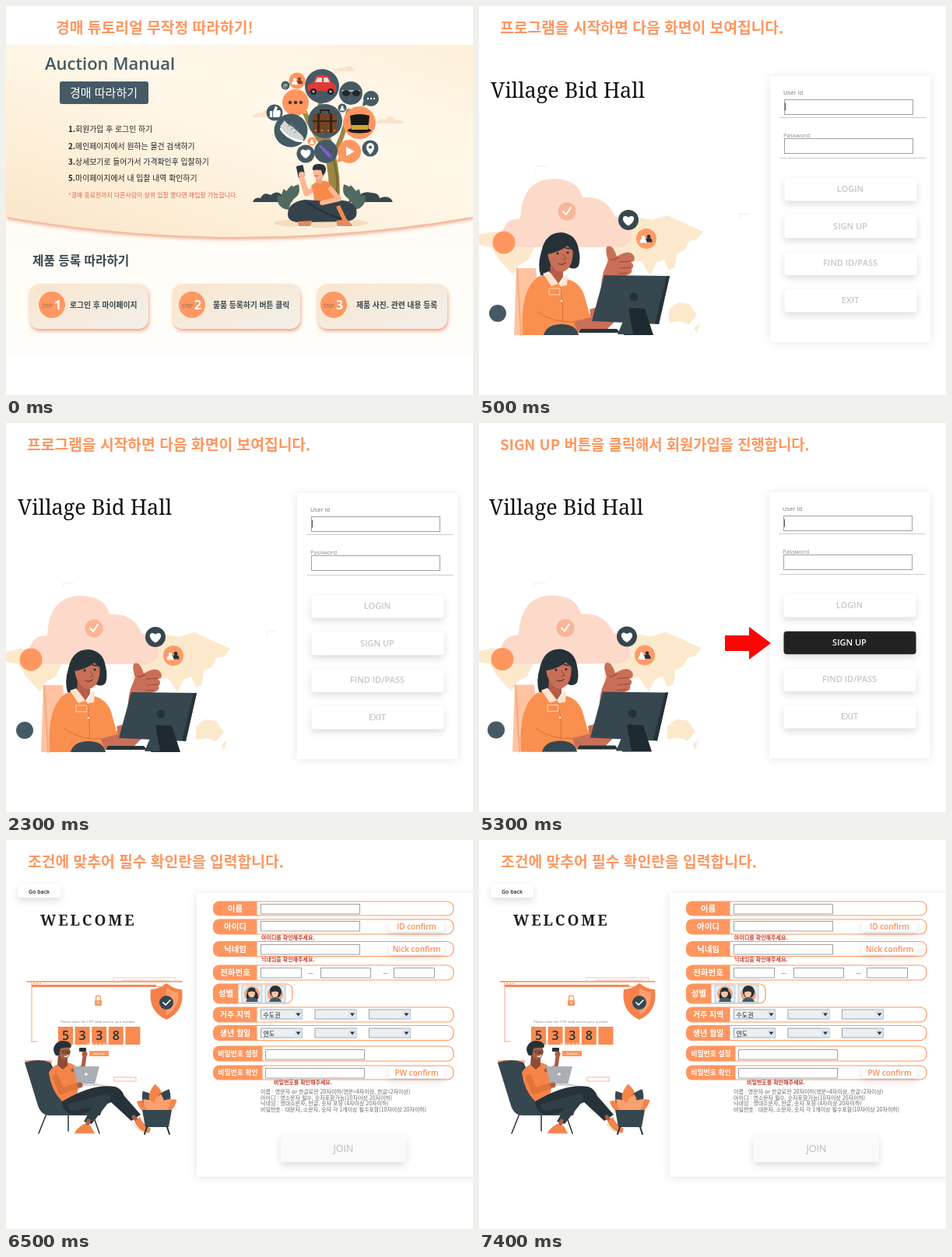
Recreate the animation shown at these times as an HTML page. Size 600x500 px, loop 8 s.

```html
<!DOCTYPE html>
<html lang="ko">
<head>
<meta charset="utf-8">
<title>경매 튜토리얼</title>
<style>
html, body { margin: 0; width: 100%; height: 100%; overflow: hidden; background: #fff; }
svg { display: block; width: 600px; height: 500px; font-family: "Noto Sans CJK KR", "Noto Sans CJK", "Noto Sans", sans-serif; white-space: pre; }
.latin { font-family: "Open Sans", "Noto Sans", sans-serif; }
.slab { font-family: "Noto Serif", serif; }
.b { font-weight: 700; }
.m { font-weight: 500; }
.s { font-weight: 600; }
.c { text-anchor: middle; }
.lift { filter: drop-shadow(0 4px 5px #0002); }
.panel { filter: drop-shadow(0 1px 6px #0000001a); }
.warm { filter: drop-shadow(1px 3px 2px #f0a98a); }
</style>
</head>
<body>
<svg id="stage" viewBox="0 0 600 500"></svg>
<script>
const ORANGE = '#ff965f', INK = '#263238', SLATE = '#455a64', CREAM = '#fce9cc', BROWN = '#c96f58';

const text = (x, y, size, str, fill = INK, cls = '', extra = '') =>
  `<text x="${x}" y="${y}" font-size="${size}" fill="${fill}" class="${cls}" ${extra}>${str}</text>`;
const disc = (x, y, r, fill) => `<circle cx="${x}" cy="${y}" r="${r}" fill="${fill}"/>`;
const oval = (x, y, rx, ry, fill) => `<ellipse cx="${x}" cy="${y}" rx="${rx}" ry="${ry}" fill="${fill}"/>`;
const box = (x, y, w, h, fill, r = 0, extra = '') =>
  `<rect x="${x}" y="${y}" width="${w}" height="${h}" rx="${r}" fill="${fill}" ${extra}/>`;
const shape = (d, fill) => `<path d="${d}" fill="${fill}"/>`;
const line = (d, stroke, w = 1) =>
  `<path d="${d}" fill="none" stroke="${stroke}" stroke-width="${w}" stroke-linecap="round" stroke-linejoin="round"/>`;
const at = (x, y, scale, angle, body) =>
  `<g transform="translate(${x} ${y}) rotate(${angle}) scale(${scale})">${body}</g>`;
const each = (list, draw) => list.map(draw).join('');

const heart = (x, y, s) => at(x, y, s, 0, shape('M0 6C-11-1-6-9 0-4C6-9 11-1 0 6Z', '#fff'));
const bust = (x, y, s, fill) => at(x, y, s, 0, disc(0, -3, 2.6, fill) + shape('M-5 5q0-6 5-6t5 6z', fill));
const leaf = (x, y, len, angle, fill) => at(x, y, len / 10, angle, shape('M0 0q-5-5 0-10q5 5 0 10z', fill));
const dots = (x, y, gap, r, fill, n = 3) => each([...Array(n).keys()], i => disc(x + i * gap, y, r, fill));
const heading = (x, str, size = 19.25) => text(x, 35, size, str, ORANGE, 'b');

function auctionTree() {
  const skin = '#ffb696', trunk = '#9b8745';
  return shape('M316 143q4-7 11-5q6-8 12 2q7-2 9 3zM474 151q6-8 13-5q8-9 15 1q7-1 9 4zM421 84q8-7 15-4q6-7 13 4z', '#fbe2cd')
    + oval(405, 279, 61, 6, '#f5dcc0')
    + line('M421 252Q425 212 410 170', trunk, 14) + line('M412 185Q392 160 383 135', trunk, 6)
    + line('M418 195Q434 170 440 135M408 165Q400 130 406 115', trunk, 6)
    + line('M425 248Q429 212 414 180', '#7b6b35', 3)
    + shape('M317 252q3-7 10-5q4-9 13-4q8-7 15 0q9-1 13 9zM440 252q4-8 12-6q6-9 17-6q10 0 11 7q13-5 17 5z', '#37474f')
    + each([-40, -18, 8, 30], (a, i) => leaf(364, 262 - i * 4, 24, a, '#526a61') + leaf(446, 262 - i * 4, 24, -a, '#526a61'))
    // goods and badges
    + disc(406, 103, 22, SLATE) + shape('M388 109v-8l6-2 4-9q8-3 16 0l5 9 5 3v8z', '#e03a35')
    + shape('M397 98l3-6h6v6zM408 92h5l3 6h-8z', '#d7e3e8') + disc(395, 110, 4, '#222') + disc(417, 110, 4, '#222')
    + disc(395, 110, 1.6, '#bbb') + disc(417, 110, 1.6, '#bbb')
    + disc(443, 112, 15, SLATE) + line('M432 109h22', '#e3dcc8', 1.5) + oval(437, 112, 5, 4, '#20282b') + oval(450, 112, 5, 4, '#20282b')
    + disc(469, 119, 10, SLATE) + shape('M459 122l-1 7 7-3z', SLATE) + dots(465, 119, 4, 1.2, '#fff')
    + disc(359, 102, 5.5, SLATE) + text(359, 104.5, 7, '@', '#fff', 'c latin')
    + disc(374, 96, 10.5, ORANGE) + bust(377, 96, .8, '#7a3d25') + bust(371, 97, .8, '#fff')
    + disc(372, 124, 17, ORANGE) + shape('M376 139l12-1-4-9z', ORANGE) + dots(365, 124, 7, 2.3, '#4d3a33')
    + disc(345, 137, 10.5, SLATE) + shape('M339 135h3v8h-3zM343 136l3-7q4 0 2 5h4q2 4-1 9h-8z', '#fff')
    + disc(366, 160, 21.5, SLATE) + shape('M352 155l6-8q4 6 10 8l11 10q6 6 2 9-9 3-17-5-9-7-12-14z', '#d4d5d5')
    + line('M353 158q9 14 28 16', '#fff', 2.5) + line('M362 155l6-3M366 159l5-4M370 163l5-4', '#8b9296')
    + disc(410, 148, 22, SLATE) + line('M404 138v-4h11v4', '#2e1b12', 2) + box(394, 138, 31, 25, '#714528', 2)
    + box(394, 147, 31, 2, '#3b2213') + box(400, 138, 3, 25, '#3b2213') + box(416, 138, 3, 25, '#3b2213') + dots(398, 160, 8, 1, '#d6a35b', 4)
    + disc(432, 131, 5.5, SLATE) + bust(432, 131.5, .6, '#fff')
    + disc(454, 150, 21, ORANGE) + shape('M442 141q12-4 25 0l-2 19h-21z', '#181818') + oval(454, 160, 15, 3.5, '#181818') + shape('M443 153h23l-1 6h-21z', '#cfa533')
    + disc(385, 190, 11.5, SLATE) + heart(385, 190, 1)
    + disc(393, 174, 5.5, ORANGE) + bust(393, 174.5, .6, '#fff')
    + disc(411, 187, 15, SLATE) + shape('M401 179l4-1 14 13 1 6-6-2z', '#6d55b3') + line('M403 180l13 13', '#a793dd')
    + disc(441, 187, 15, ORANGE) + shape('M428 192l-3 9 9-2z', ORANGE) + shape('M437 181l11 6-11 6z', '#fff')
    + disc(468, 183, 10.5, SLATE) + shape('M468 191q-6-7-5-10a5 5 0 0 1 10 0q1 3-5 10z', '#fff') + disc(468, 181.5, 2, SLATE)
    // reader under the tree
    + line('M396 235L386 241 380 221', skin, 7)
    + box(374, 205, 9, 15, '#2c3a42', 1.5, 'transform="rotate(-12 378 212)"') + disc(380, 217, 4, skin)
    + shape('M392 231q10-9 22-5 9 12 8 27-12 6-27 2 2-13-3-24z', '#f58a4b')
    + box(398, 217, 8, 11, '#f2a382') + oval(402, 214, 7.5, 9, skin)
    + shape('M394 211q-1-8 7-8 9-1 10 6 0 6-4 9l-2-7q-6-1-11 0z', '#2c3338') + line('M397 218q2 2 4 0', '#a8503c')
    + shape('M362 268q0-16 22-19l28 2q30-5 37 8 6 14-10 18l-63 1q-14-1-14-10z', '#34434b')
    + line('M386 252q20 14 46 22', '#22303a', 2) + line('M417 235l11 13-22 5', skin, 6)
    + shape('M424 258l5-2 10 21-5 2z', '#f58a4b') + shape('M375 277l18-1-2 8h-15zM424 276l14-2 8 9-20 1z', '#e88a58') + line('M424 284h22M375 284h17', '#fff', 2);
}

function stepCard(x, w, cx, n, label, lx) {
  return box(x, 357, w, 58, 'url(#card)', 13, 'class="warm"') + disc(cx, 384, 17, '#ff9862')
    + text(cx - 13, 388, 7.2, 'STEP', '#9a6a50', 'latin', 'letter-spacing="-.6"') + text(cx + 3, 390, 16, n, '#fff', 'b latin')
    + text(lx, 388, 9.8, label, '#37474f', 'b');
}

function manualScene() {
  const items = [[162, 1, '회원가입 후 로그인 하기'], [184, 2, '메인페이지에서 원하는 물건 검색하기'],
    [204, 3, '상세보기로 들어가서 가격확인후 입찰하기'], [225, 5, '마이페이지에서 내 입찰 내역 확인하기']];
  return box(0, 50, 600, 400, 'url(#floor)')
    + `<path d="M0 50H600V271Q300 323 0 271Z" fill="url(#sky)" class="warm"/>`
    + heading(64, '경매 튜토리얼 무작정 따라하기!')
    + text(50, 82, 22, 'Auction Manual', SLATE, 's latin')
    + box(69, 97, 114, 29, SLATE, 3) + text(82, 117, 15, '경매 따라하기', '#fff')
    + each(items, ([y, n, s]) => text(80, y, 9.9, `<tspan class="b">${n}.</tspan>${s}`, '#222', 'm'))
    + text(80, 246, 7.9, '*경매 종료전까지 다른사람이 상위 입찰 했다면  재입찰 가능합니다.', '#e5604f')
    + auctionTree()
    + text(34, 333, 15.7, '제품 등록 따라하기', '#37474f', 'b')
    + stepCard(30, 153, 59, 1, '로그인 후 마이페이지', 82)
    + stepCard(214, 164, 239, 2, '물품 등록하기 버튼 클릭', 266)
    + stepCard(400, 167, 421, 3, '제품 사진. 관련 내용 등록', 450);
}

function officeWoman() {
  const dark = '#37474f';
  return shape('M0 294l18-4 30 4 26 10-10 22-14 8-6 12-20-22-8-14-16-3zM172 300l8-22 16-8 26 5 20-6 26 12 20 9-8 10-10 2-6 12-10 4-2 18-8 4-6-14-10 4-8 16-12-18-22 2-12 16-12-18zM66 356l18 6-8 36-8 16zM244 390l12-9 14 2 10 14-10 12-12-4-14 2zM276 414l8-6-4 12z', CREAM)
    + shape('M45 310q-18-4-14-22 4-15 22-15 2-50 42-51 32 0 38 24 30-3 42 25 16 0 20 16 5 18-14 23z', '#fdd9ca')
    + disc(113, 264, 11.5, '#f9b597') + line('M108 264l4 4 6-9', '#fff', 2)
    + disc(192, 275, 13, dark) + heart(192, 276, 1.1)
    + disc(215, 299, 13, '#ff9a66') + bust(218, 299, .9, INK) + bust(211, 300, .9, '#fff')
    + disc(32, 304, 14.5, ORANGE) + disc(24, 395, 11, SLATE)
    + shape('M48 337h25l8 86H45z', '#ffc3a1') + line('M49 338l5 85', '#f4aa83', 2)
    // hair, head and body
    + shape('M79 346q-4-14 1-30 5-25 26-25 19 2 22 22 3 12 0 21-5 6-12 2l-16 10q-10 4-21 0z', INK)
    + shape('M92 328h16v20l-8 12-9-14z', '#b45d49') + shape('M88 312q6-8 14-7 13-2 18 4 2 16-3 25-6 10-16 7-13-8-13-29z', BROWN)
    + shape('M87 319q-2-22 18-24 17 1 20 20-8-1-11-7-12 9-27 11z', INK)
    + disc(101, 318, 1.5, INK) + disc(114, 317, 1.5, INK) + line('M97 313l5-1M111 311l5 1', INK, 1.5) + line('M108 319l4 6-4 1', '#96483a') + line('M102 331q5 3 9-1', '#7d3329', 1.3)
    + shape('M56 423q-4-58 20-75l16-5 12 16 9-8q16 4 22 20l7 25 9-2 5 13-35 16z', '#f9904f')
    + shape('M82 344l8-3 12 16-9 3zM111 345l3 2-1 12-10 2z', '#ffe4d2') + line('M104 360q6 30 2 60', '#d8703a')
    + box(90, 363, 14, 8, 'none', 0, 'stroke="#ffd3b5"') + dots(106, 379, 1, 1.2, '#fff', 1)
    + shape('M157 385q-2-34 5-48l4-10q-5-15-1-18 7-3 12 13 16-10 22-1 3 7-4 8 6 4 1 9 2 6-6 8-7 4-16 4-2 18 2 35z', BROWN)
    + line('M179 323q-6 4-10 3M180 329l15-1M181 337l14-1M180 344l10-1', '#96483a', 1.2)
    + shape('M142 390l20-6 12 22-12 12h-38l-4-12 24-6z', BROWN) + shape('M66 388q22 24 56 18l6 17H64z', '#f9904f') + line('M75 393q20 15 50 13', '#d8703a')
    // desk equipment
    + shape('M161 346l84 1-14 62-86-4z', dark) + shape('M241 347h4l-14 62-5-1z', INK) + disc(199, 374, 5.5, INK)
    + shape('M193 388l20 1 11 34h-38z', '#1f2a30') + shape('M192 389l6 33h-20z', dark)
    + shape('M131 415h46l4 5h-53z', INK) + shape('M83 423q4-14 23-14t22 14z', dark);
}

const field = (x, y, w, h, stroke = '#a0a0a0', fill = '#fff') => box(x, y, w, h, fill, 0, `stroke="${stroke}"`);

function loginScene(title, chosen, size) {
  const shift = chosen ? -1 : 0;
  const buttons = ['LOGIN', 'SIGN UP', 'FIND ID/PASS', 'EXIT'];
  return heading(27, title, size)
    + `<g transform="translate(${2 * shift} ${shift / 2})">`
    + text(15, 118, 27, 'Village Bid Hall', '#111', 'slab') + officeWoman()
    + line('M73 212v-6h14' + (chosen ? '' : 'M335 273v-6h12'), '#eee') + '</g>'
    + `<g transform="translate(${shift} ${shift})">`
    + box(374, 90, 206, 342, '#fff', 3, 'class="panel"')
    + text(391, 113.5, 7.6, 'User Id', '#777', 'latin') + text(391, 169, 7.6, 'Password', '#888', 'latin')
    + field(392.5, 120.5, 165, 19) + field(392.5, 170.5, 165, 19)
    + line('M393.5 125v9', '#555') + line('M387 143.5H574M387 195.5H574', '#ccc')
    + each(buttons, (label, i) => {
      const y = 221 + i * 47.7, on = label === chosen;
      return box(392.5, y, 170, 29.5, on ? '#222' : '#fff', 4, 'class="lift"')
        + text(477, y + 18, 11, label, on ? '#fff' : '#c8c5c5', 'c s latin');
    }) + '</g>'
    + (chosen ? shape('M316 273h31v-11l28 21-28 21v-11h-31z', '#fb0505') : '');
}

function verifyMan() {
  const skin = '#a95f43', dark = '#37474f';
  return line('M33 259V182M33 188.5H198M40 259h-7', '#f6a27a') + line('M27 182H226', '#f58a55', 1.3) + box(33, 186, 160, 3, '#f58a55')
    + line('M138 182v-5h80v5M150 180h60', '#f8b898', .8)
    + dots(36, 184.5, 4, 1, ORANGE) + box(24, 283, 35, 4, '#fbb28d') + box(139, 305, 28, 5, 'none', 0, 'stroke="#f8b898"')
    + line('M115.5 207v-4a3 3 0 0 1 6 0v4', ORANGE, 1.3) + box(114, 206, 9, 7, ORANGE, 1) + disc(118.5, 209, 1, '#fff')
    + text(118, 235, 4.3, 'Please enter the CITY code sent to your number', '#777', 'c latin')
    + each(['5', '3', '3', '8', ''], (n, i) => box(67 + i * 21.6, 240, 19, 23, '#f98a50') + text(76.5 + i * 21.6, 257, 16, n, INK, 'c s latin'))
    + dots(106, 262, 5, 1.5, '#fbc3a4', 6) + box(107, 271, 25, 7, ORANGE) + text(119.5, 276, 4.3, 'Submit', '#fff', 'c latin')
    + shape('M206 184q10 8 20 8 4 28-20 39-24-11-20-39 10 0 20-8z', '#f5814a') + shape('M206 190q8 5 15 6 2 20-15 29z', '#ff9d6d')
    + disc(206, 209, 9, dark) + line('M202 209l3 3 6-6', '#fff', 1.7)
    // armchair and figure
    + line('M52 352l-10 25M112 354l8 23M80 352v22', INK, 1.5)
    + shape('M24 286q18-6 33 0l22 48 40 6q6 5 2 14H56q-12 0-16-16z', dark) + line('M57 288l20 46 40 7', INK, 1.5)
    + shape('M55 299q7-13 24-13 12 2 17 14l-6 36H72q-14-14-17-37z', '#f58448')
    + line('M86 296l13-4 2-14', skin, 5) + box(94, 267, 9, 5, INK, 1) + disc(101, 275, 3.5, skin)
    + shape('M67 276h12v14l-6 5-7-6z', '#8e4b35') + oval(75, 272, 7.5, 10, skin)
    + shape('M64 277q-6-8 0-15 6-6 15-3 7 3 4 8-8-1-13 1l-2 9z', INK) + line('M73 271h4v3h-4zM79 271h3v3h-3z', INK, .8) + line('M75 278q3 1 5-1', '#fff', 1.2)
    + shape('M72 336q40-24 68-19 8 2 12 12l21 24-12 8-26-24-35 15q-26 6-28-16z', INK)
    + shape('M78 340l50-14q10 2 4 11l-22 28-10-3 10-18-28 4z', '#303e46')
    + shape('M86 291h34l-6 23H92z', '#a9afb3') + disc(103, 301, 2, '#e7eaec') + shape('M88 313h28l14 3H90z', '#d0d4d6')
    + line('M64 305l7 18 20-7', '#e2733b', 8) + disc(95, 315, 3.5, skin)
    + line('M106 361l-2 6M164 356l5 5', skin, 5)
    + shape('M100 365l9 3 5 9H88q2-6 12-12zM165 362l7-6q3 9 14 15l-2 6q-14-3-19-15z', '#f58448') + line('M88 377.500h26M164 364q6 12 20 13', '#ddd', 1.5)
    // potted plant
    + each([-62, -34, -4, 28, 58], (a, i) => leaf(194, 350, 37 - Math.abs(a) * .12, a, i % 2 ? dark : '#f58448'))
    + each([-45, 12, 45], a => leaf(194, 351, 25, a, '#f9a06f'))
    + shape('M175 347h38l-4 22h-30z', dark) + line('M181 369l-3 9M207 369l3 9', INK, 2);
}

const dropdown = (x, y, label = '', w = 53) => field(x, y, w, 12, '#9aa3ad', '#eceff1') + text(x + 3, y + 9.5, 8, label, '#222')
  + box(x + w - 10, y + .5, 10, 11, '#dbe7f3') + shape(`M${x + w - 8} ${y + 4.5}h6l-3 4z`, '#333');
const formButton = (label, y) => box(492, y, 71, 14, '#fff', 3, 'class="lift"') + text(527.5, y + 11, 10, label, '#f98c55', 'c s latin');

function formRow(label, y, h, w = 56, size = 10.5, right = 575) {
  const left = 266.5;
  return box(left, y, right - left, h, '#fff', 8, `stroke="${ORANGE}" stroke-width="1.2"`)
    + shape(`M${left + w} ${y}h${-w + 7}q-7 0-7 7v${h - 14}q0 7 7 7h${w - 7}z`, ORANGE)
    + text(left + w / 2, y + h / 2 + size * .37, size, label, '#fff', 'c b');
}

function portrait(x, hair) {
  return box(x, 187, 26, 22, '#dfeef3', 0, 'stroke="#9bb6c0" stroke-width=".7"') + disc(x + 13, 198, 10, '#f7a27d')
    + shape(`M${x + 6} ${195 + hair}q-1-10 7-10t8 10l-3 5h-9z`, INK) + oval(x + 12.5, 197, 4.5, 5.5, '#f6c3a7')
    + shape(`M${x + 7} 194q3-7 10-3l1 5q-5-3-11 0z`, INK) + shape(`M${x + 5} 208q2-6 8-6t8 6z`, SLATE);
}

function signupScene() {
  const rows = [['이름', 79, 18], ['아이디', 102, 19], ['닉네임', 130.5, 19], ['전화번호', 161, 19], ['성별', 185, 25, 32, 10.5, 368],
    ['거주 지역', 215, 19, 56, 10], ['생년 월일', 238.5, 19, 56, 10], ['비밀번호 설정', 265, 19, 63, 8.9], ['비밀번호 확인', 290, 18, 63, 8.9]];
  const rules = ['이름 : 영문자 or 한글로만 20자이하(영문=4자이상, 한글=2자이상)', '아이디 : 영소문자 필수, 숫자포함가능(10자이상 20자이하)',
    '닉네임 : 영대소문자, 한글, 숫자 포함 (4자이상 20자이하)', '비밀번호 : 대문자, 소문자, 숫자 각 1개이상 필수포함(10자이상 20자이하)'];
  const notes = [[328, 128, '아이디를 확인해주세요.'], [328, 156, '닉네임을 확인해주세요.'], [344, 314, '비밀번호를 확인해주세요.']];
  const inputs = [[327.5, 82.5, 127], [327.5, 104.5, 127], [327.5, 134.5, 127], [327.5, 164.5, 52], [404.5, 164.5, 64], [498.5, 164.5, 52], [333.5, 269.5, 127], [333.5, 293.5, 127]];
  return heading(28, '조건에 맞추어 필수 확인란을 입력합니다.')
    + box(15, 57, 55, 17, '#fff', 3, 'class="lift"') + text(42.5, 68.5, 7, 'Go back', '#222', 'c s latin')
    + text(44, 110, 19, 'WELCOME', '#222', 'slab s', 'letter-spacing="2.9"')
    + verifyMan()
    + box(245, 68, 370, 365, '#fff', 0, 'class="panel"')
    + each(rows, r => formRow(...r))
    + each(inputs, ([x, y, w]) => field(x, y, w, 12.5))
    + line('M389 171.5h5M485 171.5h5', ORANGE, 1.2)
    + portrait(303, 8) + portrait(333, 2)
    + each(['수도권', '연도'], (label, i) => each([label, '', ''], (s, k) => dropdown(327.5 + k * 69.5, 218 + i * 24, s)))
    + formButton('ID confirm', 104) + formButton('Nick confirm', 133) + formButton('PW confirm', 292)
    + each(notes, ([x, y, s]) => text(x, y, 7, s, '#c23b32', 'b'))
    + each(rules, (s, i) => text(327, 326 + i * 7.7, 7, s, '#666'))
    + box(353, 379, 161, 35, '#fafafa', 4, 'class="lift"') + text(433.5, 401, 12.5, 'JOIN', '#b9b9b9', 'c latin');
}

const gradient = (id, dir, ...colors) => `<linearGradient id="${id}" ${dir}>`
  + each(colors, (c, i) => `<stop offset="${i / (colors.length - 1)}" stop-color="${c}"/>`) + '</linearGradient>';
const scenes = [
  [0, manualScene()],
  [500, loginScene('프로그램을 시작하면 다음 화면이 보여집니다.')],
  [3500, loginScene('SIGN UP 버튼을 클릭해서 회원가입을 진행합니다.', 'SIGN UP', 18.75)],
  [6500, signupScene()],
];
const stage = document.getElementById('stage');
stage.innerHTML = '<defs>' + gradient('sky', 'x1="0" y1="1" x2=".9" y2="0"', '#f9e4c5', '#fdf0da', '#fff9ec', '#fdf1db')
  + gradient('floor', 'x1="0" y1="0" x2="0" y2="1"', '#fffaf0', '#fffcf6', '#fffdf9')
  + gradient('card', 'x1="0" y1="0" x2="1" y2="1"', '#fae6cc', '#f5ebdc', '#f3efeb') + '</defs>'
  + each(scenes, ([, body]) => `<g class="scene">${body}</g>`);
const groups = [...stage.querySelectorAll('.scene')];

function render() {
  const time = performance.now() % 8000;
  const current = scenes.findLastIndex(([start]) => time >= start);
  groups.forEach((g, i) => g.style.display = i === current ? '' : 'none');
  requestAnimationFrame(render);
}
render();
</script>
</body>
</html>
```
